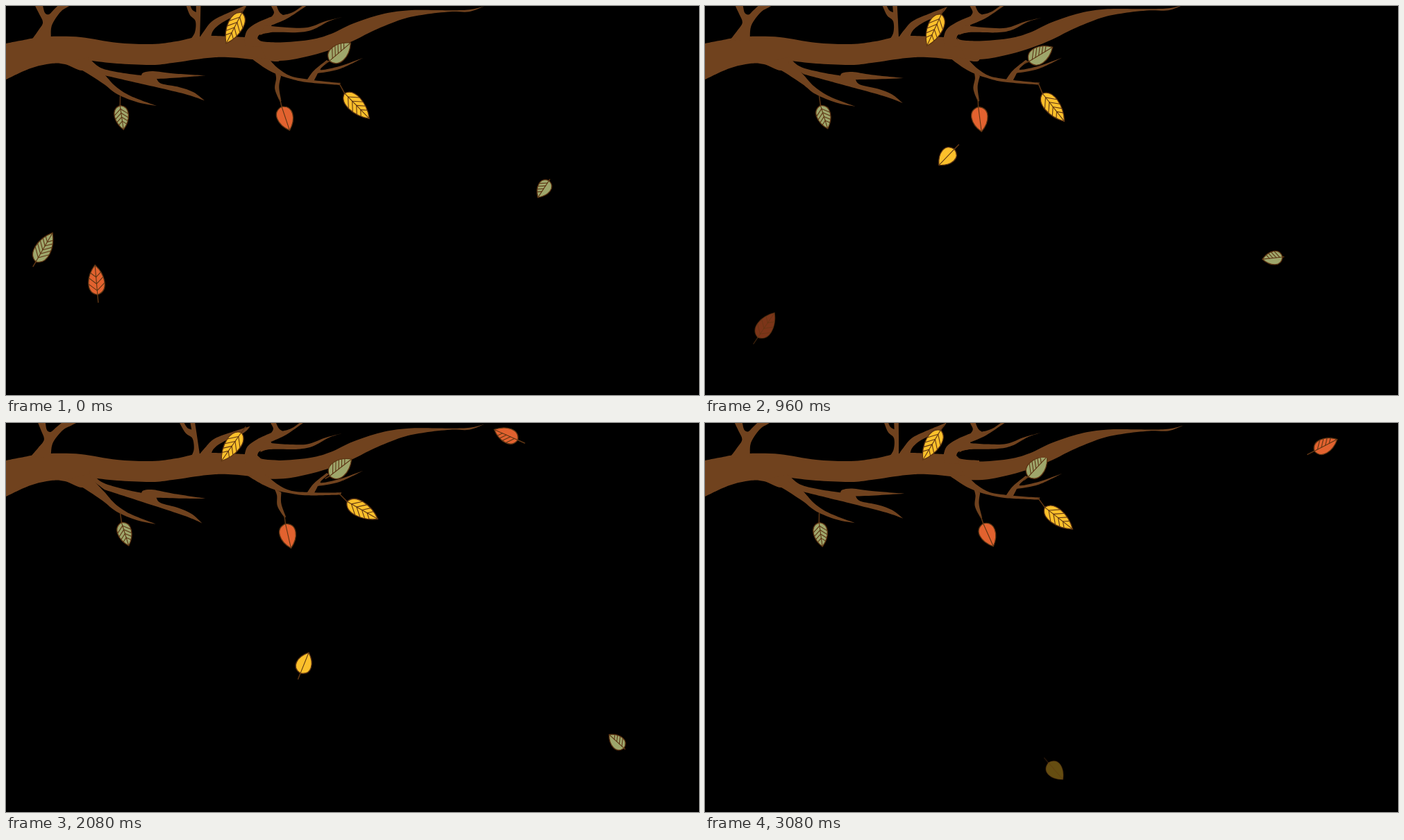
Write an HTML page with a canvas that moves like this. It is 998x561 px and loops after 3120 ms.

```html
<!DOCTYPE html>
<html>
<head>
<meta charset="utf-8">
<title>Autumn branch</title>
<style>
html, body { margin: 0; width: 100%; height: 100%; overflow: hidden; background: #000; }
canvas { display: block; }
</style>
</head>
<body>
<canvas id="stage" width="998" height="561"></canvas>
<script>
const ctx = document.getElementById('stage').getContext('2d');
const LOOP = 3120, STEP = 40, FADE = 400, BREEZE = 3400, GUST = 4100;
const BARK = '#70421e', INK = '#5e3513';
const YELLOW = '#fcc02b', RED = '#e2622f', GREEN = '#9ea66b';

const clamp = v => Math.max(0, Math.min(1, v));
const rad = deg => deg * Math.PI / 180;
const still = () => 0;
const wave = (mid, amp, peak, period = BREEZE) =>
  t => mid + amp * Math.cos(2 * Math.PI * (t - peak) / period);

// Wind on the parts of the tree
const sway = wave(.5, .5, 1880);
const lift = wave(-4, 6, 460);
const dropX = wave(396.7, 4.6, 2280);
const dip = wave(.9, 2.6, 2900, GUST);

// Closed outline: smooth runs of points, with a corner at each slash
function shape(text) {
  const path = new Path2D();
  let corner = null;
  for (const run of text.split('/')) {
    const p = run.trim().split(' ').map(q => q.split(',').map(Number));
    if (corner) p.unshift(corner);
    else path.moveTo(...p[0]);
    for (let i = 0; i < p.length - 1; i++) {
      const a = p[Math.max(0, i - 1)], b = p[i], c = p[i + 1], d = p[Math.min(p.length - 1, i + 2)];
      path.bezierCurveTo(b[0] + (c[0] - a[0]) / 6, b[1] + (c[1] - a[1]) / 6,
        c[0] - (d[0] - b[0]) / 6, c[1] - (d[1] - b[1]) / 6, c[0], c[1]);
    }
    corner = p[p.length - 1];
  }
  path.closePath();
  return path;
}

const part = (outline, pivot = [0, 0], turn = still, shift = still) =>
  ({ path: shape(outline), pivot, turn, shift });

const wood = [
  // trunk
  part('0,54 41,46 / 65,44 108,45 160,53 210,55 245,51 267,46 / 295,43 344,45 / 370,52 395,54 / 395,78 380,79 / ' +
    '355,77 320,74 290,75 240,82 210,85 160,83 123,79 / 110,93 85,84 65,83 35,90 0,106'),
  // upper twigs, left to right
  part('36,50 46,36 53,24 48,12 42,0 38,-12 / 50,-12 / 53,0 56,10 62,12 69,5 86,-12 / 110,-12 / 91,0 80,7 70,20 65,32 65,50',
    [55, 45], t => .088 * sway(t)),
  part('265,49 272,38 273,22 265,13 260,0 256,-14 / 262,-14 / 266,0 269,6 274,9 / 274,-14 / 281,-14 / 280,20 279,48',
    [273, 46], t => -.19 * sway(t)),
  part('278,47 286,35 298,21 324,8 347,-2 / 338,9 311,24 298,36 295,48',
    [285, 45], t => .11 * sway(t)),
  part('343,48 348,34 362,24 383,15 / 386,9 382,0 378,-12 / 388,-12 / 390,0 394,9 399,13 / 415,8 440,-10 / 448,-10 / ' +
    '431,1 405,18 382,28 / 384,37 366,41 362,47 / 370,58 345,58',
    [350, 45], t => -.03 * sway(t)),
  part('372,28 382,29 405,31 434,31 460,22 484,16 / 465,22 442,34 420,38 380,38 366,42',
    [385, 33], t => -dip(t) / 170),
  // long bough
  part('362,46 370,51 400,52 440,48 468,40 500,25 540,12 580,6 640,6 668,5 689,0 / ' +
    '667,8 640,8 603,12 570,19 530,35 500,50 470,62 440,71 405,78 376,79',
    [0, 0], still, dip),
  // lower left twigs
  part('118,74 142,99 158,116 180,130 217,144 / 190,139 160,127 140,112 110,93 85,82',
    [123, 79], t => .02 * sway(t)),
  part('118,74 136,89 165,96 195,100 / 198,96 212,94 240,97 288,100 / 250,103 217,105 / 224,112 250,117 270,124 286,136 / ' +
    '262,128 225,119 190,111 142,100 / 120,86',
    [185, 100], t => .09 * sway(t)),
  // lower right twigs
  part('350,73 372,89 389,98 410,105 433,110 480,114 / 482,111 / 460,109 436,106 410,101 392,90 378,76',
    [380, 93], t => lift(t) / 95),
  part('387,94 389,104 387,120 394,138 / 396,137 / 393,117 396,101',
    [391, 98], t => (394 - dropX(t)) / 38),
  part('432,109 440,97 448,89 462,78 / 465,80 / 453,92 480,87 500,80 514,75 / 480,91 449,97 / 443,109',
    [0, 0], still, t => .6 * lift(t))
];

// A leaf swinging on its stem: angles in degrees, tilt is the bend between stem and blade
const hanging = (anchor, reach, swing, tilt) => t => {
  const from = anchor(t), angle = rad(swing(t));
  return {
    from,
    x: from[0] + reach * Math.cos(angle),
    y: from[1] + reach * Math.sin(angle),
    angle: angle + rad(tilt)
  };
};

// A leaf gliding smoothly through a few points [time, x, y, heading]
const falling = (...points) => t => {
  const last = points.length - 1;
  let i = 0;
  while (i < last - 1 && points[i + 1][0] <= t) i++;
  const span = points[i + 1][0] - points[i][0], u = (t - points[i][0]) / span;
  const ease = u * u * (3 - 2 * u);
  const [x, y, angle] = [1, 2, 3].map(n => {
    const slope = k => {
      const a = points[Math.max(0, k - 1)], b = points[Math.min(last, k + 1)];
      return (b[n] - a[n]) / (b[0] - a[0]);
    };
    const p = points[i][n], q = points[i + 1][n];
    return p + (q - p) * ease + span * u * (1 - u) * (slope(i) * (1 - u) - slope(i + 1) * u);
  });
  return { x, y, angle: rad(angle) };
};

const BOTH = [-1, 1];
const leaves = [
  { fill: YELLOW, len: 50, wide: 22, veins: 4, sides: BOTH,
    pose: hanging(t => [345, 1 + 5 * sway(t)], 35, wave(120.5, 6, 2350), -1) },
  { fill: GREEN, len: 35, wide: 20, veins: 4, sides: BOTH,
    pose: hanging(() => [164.5, 130], 31, wave(80, -6.2, 1520), -4) },
  { fill: RED, len: 36, wide: 23, pose: hanging(t => [dropX(t), 134.5], 29, wave(76.5, 9, 1250, GUST), -2) },
  { fill: YELLOW, len: 51, wide: 22, veins: 4, sides: BOTH,
    pose: hanging(t => [480, 112 + lift(t)], 41, wave(47, 13, 650), -6) },
  { fill: GREEN, len: 40, wide: 24, veins: 5, sides: [-1], top: 50,
    pose: hanging(t => [460, 83 + .3 * lift(t)], 27, wave(-37, 8, 1150, GUST), -2) },
  { fill: GREEN, len: 29, wide: 19, veins: 4, sides: [1], stem: 2, end: 2330,
    pose: falling([0, 774, 264, 123], [560, 789, 323, 153], [1440, 852, 409, 197], [2480, 894, 489, 238]) },
  { fill: GREEN, len: 48, wide: 23, veins: 5, sides: BOTH, stem: 8, end: 180,
    pose: falling([0, 55, 348, -60], [560, 50, 401, -37]) },
  { fill: RED, len: 43, wide: 23, veins: 3, sides: BOTH, stem: 11, end: 780,
    pose: falling([0, 130, 395, -95], [560, 95, 440, -70], [1200, 86, 471, -48]) },
  { fill: YELLOW, len: 32, wide: 22, stem: 9, start: 340, end: 2840,
    pose: falling([340, 364, 166, 75], [960, 348, 218, 134], [1440, 361, 272, 195],
      [2080, 430, 346, 292], [2480, 473, 440, 349], [3080, 505, 502, 409]) },
  { fill: RED, len: 37, wide: 21, veins: 4, sides: [-1], stem: 11, start: 1220,
    pose: falling([1440, 666, 40, 135], [2080, 720, 17, 204], [2480, 788, 7, 257], [3080, 894, 32, 333]) }
];

function drawWood(t) {
  ctx.fillStyle = BARK;
  for (const { path, pivot: [x, y], turn, shift } of wood) {
    ctx.save();
    ctx.translate(x, y + shift(t));
    ctx.rotate(turn(t));
    ctx.translate(-x, -y);
    ctx.fill(path);
    ctx.restore();
  }
}

function line(x1, y1, x2, y2) {
  ctx.beginPath();
  ctx.moveTo(x1, y1);
  ctx.lineTo(x2, y2);
  ctx.stroke();
}

function drawLeaf(leaf, t) {
  const { fill, len, wide, pose, veins = 0, sides = [], stem = 0, top = 0, start = -FADE, end = LOOP } = leaf;
  const alpha = clamp((t - start) / FADE) * clamp(1 - (t - end) / FADE);
  if (!alpha) return;
  const { x, y, angle, from } = pose(t);
  const half = len / 2;
  ctx.save();
  ctx.globalAlpha = alpha;
  ctx.strokeStyle = INK;
  ctx.lineCap = 'round';
  ctx.lineWidth = 1.5;
  if (from) line(...from, x - half * Math.cos(angle), y - half * Math.sin(angle));
  ctx.beginPath();
  ctx.rect(0, top, 998, 561);
  ctx.clip();
  ctx.translate(x, y);
  ctx.rotate(angle);
  if (stem) line(-half - stem, 0, -half, 0);

  const body = new Path2D();
  body.moveTo(-half, 0);
  body.bezierCurveTo(-.4 * len, -.75 * wide, .15 * len, -.6 * wide, half, 0);
  body.bezierCurveTo(.15 * len, .6 * wide, -.4 * len, .75 * wide, -half, 0);
  ctx.fillStyle = fill;
  ctx.fill(body);
  ctx.save();
  ctx.clip(body);
  ctx.lineWidth = 1.1;
  line(-half, 0, half, 0);
  for (const side of sides) {
    for (let i = 0; i < veins; i++) {
      const vx = len * (-.36 + .68 * i / veins);
      line(vx, 0, vx + .24 * len, side * .5 * wide);
    }
  }
  ctx.restore();
  ctx.lineWidth = 1.3;
  ctx.stroke(body);
  ctx.restore();
}

function frame(now) {
  const t = Math.floor(now % LOOP / STEP) * STEP;
  ctx.fillStyle = '#000';
  ctx.fillRect(0, 0, 998, 561);
  drawWood(t);
  leaves.forEach(leaf => drawLeaf(leaf, t));
  requestAnimationFrame(frame);
}
requestAnimationFrame(frame);
</script>
</body>
</html>
```
